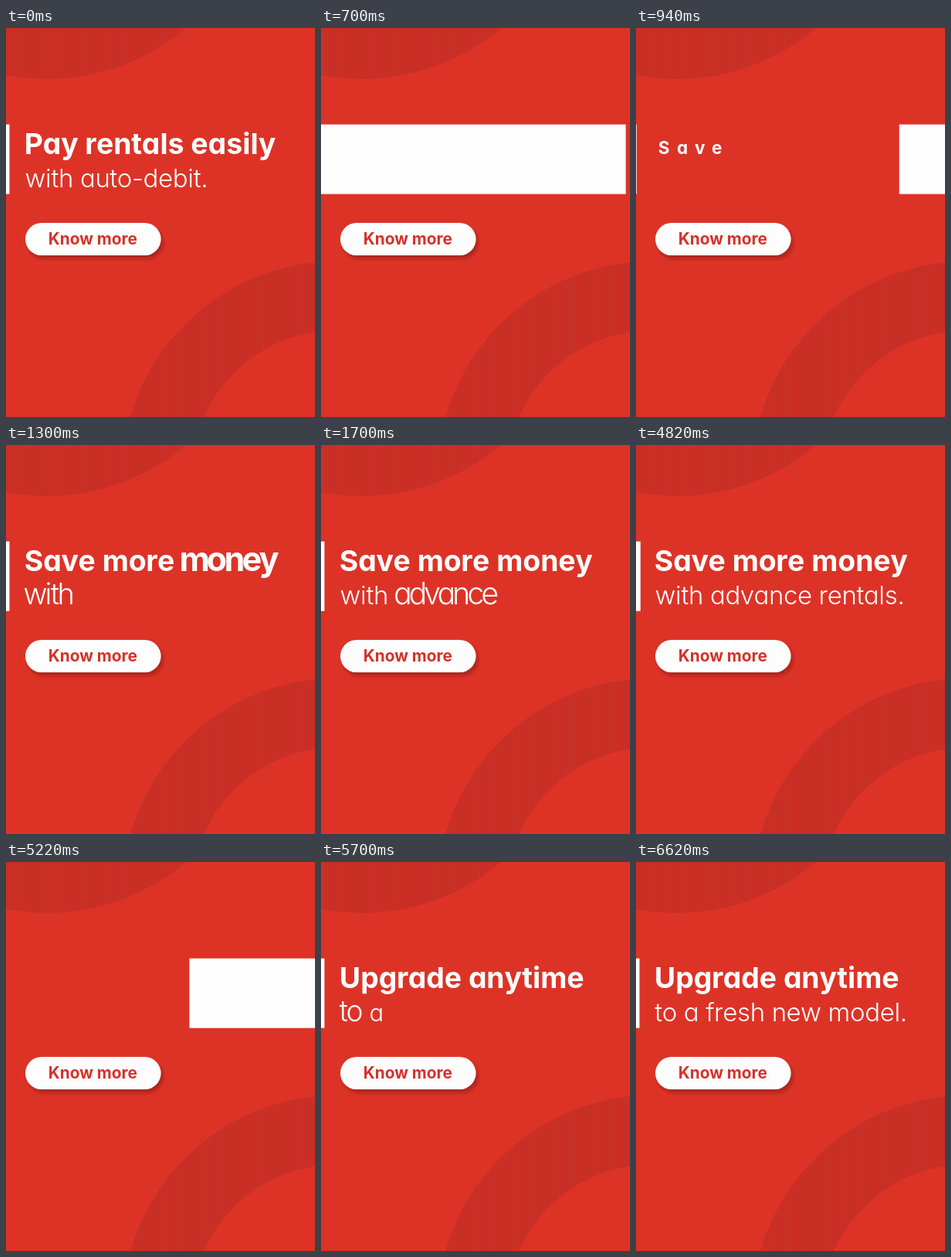
An HTML page that plays this animation: 400 px wide and 503 px high, repeating every 8 s.

```html
<!DOCTYPE html>
<html lang="en">
<head>
<meta charset="utf-8">
<title>Rental banner</title>
<style>
  html, body { margin: 0; height: 100%; overflow: hidden; background: #dd3327; }
  svg { display: block; width: 100vw; height: 100vh; }
  text { font-family: Inter, sans-serif; font-feature-settings: "cv11"; fill: #fff; }
  .heading { font-size: 37.4px; font-weight: 700; }
  .sub { font-size: 33px; font-weight: 350; letter-spacing: -.35px; }
  .glyph { text-anchor: middle; }
  .button { font-size: 20.8px; font-weight: 700; fill: #d63128; text-anchor: middle; }
</style>
</head>
<body>
<svg viewBox="0 0 400 503">
  <defs>
    <pattern id="stripes" width="4" height="8" patternUnits="userSpaceOnUse">
      <rect width="4" height="8" fill="#cd2c25"/>
      <rect width="1.5" height="8" fill="#c33428"/>
    </pattern>
    <filter id="shadow" x="-10%" y="-20%" width="120%" height="160%">
      <feDropShadow dx="3" dy="4.5" stdDeviation="2" flood-color="#7a0d08" flood-opacity=".5"/>
    </filter>
  </defs>
  <rect width="400" height="503" fill="#dd3327"/>
  <g fill="none" stroke="url(#stripes)" stroke-width="89.5">
    <circle cx="53" cy="-212.5" r="233.75"/>
    <circle cx="428.7" cy="580" r="233.75"/>
  </g>
  <rect x="25" y="252" width="175.5" height="42" rx="21" fill="#fdfdfd" filter="url(#shadow)"/>
  <text class="button" x="112.3" y="280">Know more</text>
  <g id="copy"></g>
  <g fill="#fdfdfd">
    <rect id="edge" y="124.7" height="90"/>
    <rect id="wipe" y="124.7" height="90"/>
  </g>
</svg>
<script>
const LOOP = 8000, STEP = 40, EDGE = 4.5, STAGE = 400;
const COVERED = 240;            // the wipe fills the stage, so the copy is swapped
const HEADING = { cls: "heading", x: 23.8, y: 163, from: 416, to: 880 };
const SUB = { cls: "sub", x: 24.5, y: 205.5, from: 600, to: 1800 };
const SCENES = [
  { start: -LOOP, lines: ["Pay rentals easily", "with auto-debit."] },
  { start: 500, lines: ["Save more money", "with advance rentals."] },
  { start: 4820, lines: ["Upgrade anytime", "to a fresh new model."] },
];

const copy = document.getElementById("copy");
const edge = document.getElementById("edge");
const wipe = document.getElementById("wipe");

const clamp = p => Math.min(1, Math.max(0, p));
const progress = (t, from, to) => clamp((t - from) / (to - from));
const easeOut = p => 1 - (1 - p) ** 3;
const smooth = p => p * p * (3 - 2 * p);
const cubicInOut = p => p < .5 ? 4 * p ** 3 : 1 - 4 * (1 - p) ** 3;

function addText(parent, cls, content) {
  const node = document.createElementNS("http://www.w3.org/2000/svg", "text");
  node.setAttribute("class", cls);
  node.textContent = content;
  return parent.appendChild(node);
}

// Splits a line into letters that keep their kerned places.
function splitLine(group, style, content) {
  const whole = addText(group, style.cls, content);
  whole.setAttribute("x", style.x);
  const glyphs = [];
  let word = 0;
  [...content].forEach((char, i) => {
    if (char === " ") { word++; return; }
    const middle = (whole.getStartPositionOfChar(i).x + whole.getEndPositionOfChar(i).x) / 2;
    glyphs.push({ char, word, middle });
  });
  whole.remove();
  for (const glyph of glyphs) glyph.node = addText(group, style.cls + " glyph", glyph.char);
  return { style, glyphs, words: word + 1 };
}

for (const scene of SCENES) {
  scene.group = document.createElementNS("http://www.w3.org/2000/svg", "g");
  copy.append(scene.group);
  scene.parts = [HEADING, SUB].map((style, i) => splitLine(scene.group, style, scene.lines[i]));
}

// Each word pops to 120% and settles; the next one starts at its peak.
function popScale(t, { style, words }, word) {
  const beat = (style.to - style.from) / (words + 1);
  const start = style.from + word * beat, peak = start + beat;
  return t < peak
    ? 1.2 * easeOut(progress(t, start, peak))
    : 1.2 - .2 * smooth(progress(t, peak, peak + beat));
}

function drawCopy(scene, t) {
  for (const part of scene.parts) {
    for (const { node, word, middle } of part.glyphs) {
      const scale = popScale(t, part, word);
      node.setAttribute("visibility", scale > 0 ? "inherit" : "hidden");
      node.setAttribute("transform", `translate(${middle} ${part.style.y}) scale(${scale || .001})`);
    }
  }
}

function drawBar(t) {
  const grow = cubicInOut(progress(t, -25, COVERED));
  const left = STAGE * cubicInOut(progress(t, COVERED, 540));
  const right = EDGE + (STAGE - EDGE) * grow;
  wipe.setAttribute("x", left);
  wipe.setAttribute("width", Math.max(0, right - left));
  edge.setAttribute("width", EDGE * progress(t, 400, 620));
}

function draw(time) {
  const first = SCENES[1].start;
  const now = first + Math.floor((time % LOOP - first) / STEP) * STEP;
  const started = SCENES.filter(s => now >= s.start).pop();
  const shown = SCENES.filter(s => now >= s.start + COVERED).pop();
  for (const scene of SCENES) {
    scene.group.setAttribute("visibility", scene === shown ? "visible" : "hidden");
  }
  drawCopy(shown, now - shown.start);
  drawBar(now - started.start);
}

const origin = performance.now();
function tick() {
  draw(performance.now() - origin);
  requestAnimationFrame(tick);
}
tick();
</script>
</body>
</html>
```
